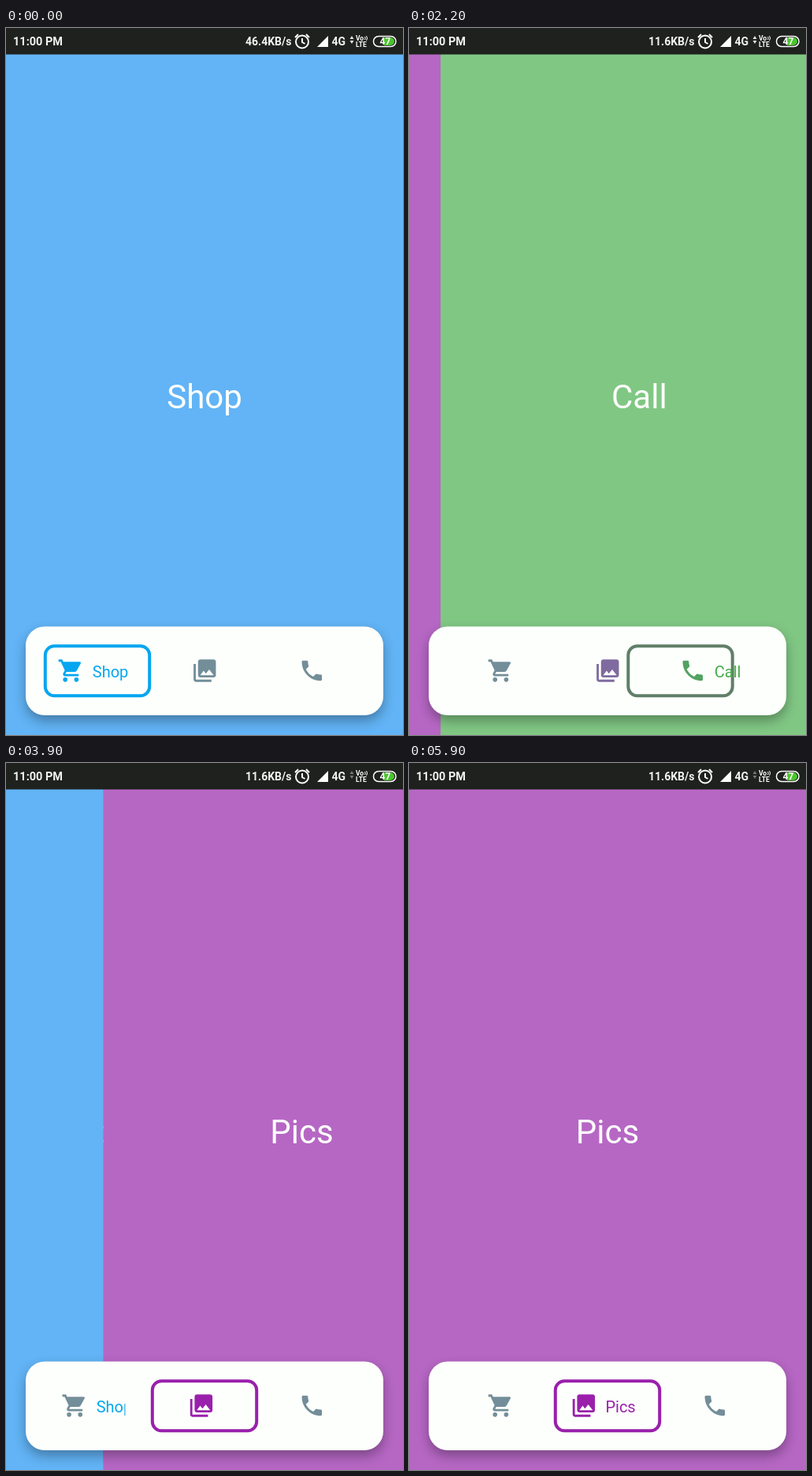
An HTML page with a canvas that plays this animation: 504 by 896 pixels, repeating every 6 s.

```html
<!DOCTYPE html>
<html lang="en">
<head>
<meta charset="utf-8">
<style>
  html, body { margin: 0; width: 100%; height: 100%; overflow: hidden; background: #1f211e; }
  canvas { display: block; }
</style>
</head>
<body>
<canvas id="stage" width="504" height="896"></canvas>
<script>
const ctx = document.getElementById('stage').getContext('2d');
const W = 504, H = 896, LOOP = 6000, STEP = 100;
const WHITE = '#fdfffc', GREY = [115, 142, 153];

const tabs = [
  { name: 'Shop', page: '#62b4f6', color: [5, 166, 240], icon:
    'M5 20a2 2 0 1 0 4 0a2 2 0 1 0-4 0zM15 20a2 2 0 1 0 4 0a2 2 0 1 0-4 0z' +
    'M1 2v2h2l3.6 7.59-1.35 2.45C4.5 15.4 5.5 17 7 17h12v-2H7.42c-.14 0-.25-.11-.25-.25l.03-.12.9-1.63h7.45' +
    'c.75 0 1.41-.41 1.75-1.03l3.58-6.49A1 1 0 0 0 20 4H5.21l-.94-2z' },
  { name: 'Pics', page: '#b667c4', color: [154, 32, 172], icon:
    'M22 16V4c0-1.1-.9-2-2-2H8c-1.1 0-2 .9-2 2v12c0 1.1.9 2 2 2h12c1.1 0 2-.9 2-2z' +
    'm-11-4l2.03 2.71L16 11l4 5H8l3-4zM2 6v14c0 1.1.9 2 2 2h14v-2H4V6z' },
  { name: 'Call', page: '#81c784', color: [68, 172, 72], icon:
    'M6.62 10.79c1.44 2.83 3.76 5.14 6.59 6.59l2.2-2.2c.27-.27.67-.36 1.02-.24 1.12.37 2.33.57 3.57.57' +
    '.55 0 1 .45 1 1V20c0 .55-.45 1-1 1-9.39 0-17-7.61-17-17 0-.55.45-1 1-1h3.5c.55 0 1 .45 1 1' +
    ' 0 1.25.2 2.45.57 3.57.11.35.03.74-.25 1.02z' }
];
for (const tab of tabs) tab.shape = new Path2D(tab.icon);

// [time of tap, tab index]
const taps = [[-2000, 0], [643, 1], [1297, 2], [2120, 1], [2880, 0], [3640, 1], [4175, 2], [5128, 1]];

const clamp = v => Math.min(1, Math.max(0, v));
const ease = u => u < .5 ? 2 * u * u : 1 - 2 * (1 - u) ** 2;
const mix = (a, b, k) => a + (b - a) * k;
const blend = (a, b, k) => `rgb(${a.map((v, i) => Math.round(mix(v, b[i], k)))})`;

function text(str, x, y, font, color, align = 'left') {
  ctx.font = font + ' Roboto, sans-serif';
  ctx.fillStyle = color;
  ctx.textAlign = align;
  ctx.fillText(str, x, y);
}

function roundRect(x, y, w, h, r) {
  ctx.beginPath();
  ctx.roundRect(x, y, w, h, r);
}

function fillShape(d, color) {
  ctx.fillStyle = color;
  ctx.fill(new Path2D(d));
}

function strokeShape(d, color, width) {
  ctx.strokeStyle = color;
  ctx.lineWidth = width;
  ctx.stroke(new Path2D(d));
}

function drawPages(position) {
  tabs.forEach((tab, i) => {
    const x = (i - position) * W;
    ctx.fillStyle = tab.page;
    ctx.fillRect(x, 33, W, H - 33);
    text(tab.name, x + 252, 482, '42px', WHITE, 'center');
  });
}

function drawStatus(t) {
  ctx.fillStyle = '#1f211e';
  ctx.fillRect(0, 0, W, 33.5);
  text('11:00 PM', 9, 22, 'bold 14.5px', '#f2f3f1');
  text((t < 1900 ? '46.4' : '11.6') + 'KB/s', 304, 22, 'bold 14px', '#f2f3f1');
  strokeShape('M384 17.5a8 8 0 1 0-16 0a8 8 0 1 0 16 0M376 13v5l3.5 2M367 12l4-4M385 12l-4-4', WHITE, 2);
  fillShape('M395 24h14V10z', WHITE);
  text('4G', 413.5, 22, 'bold 14px', '#f2f3f1');

  const busy = t < 100 || (t >= 1200 && t < 2900);
  fillShape('M436.500 14h5l-2.500-4zM436.500 16h5l-2.500 4z', busy ? '#e4e5e3' : '#777976');
  text('Vo', 444, 16, 'bold 8.500px', WHITE);
  strokeShape('M455.500 11q1.500 2 0 4M457.500 10q2.200 3 0 6', WHITE, 1);
  text('LTE', 444, 24, 'bold 8.500px', WHITE);

  ctx.fillStyle = '#4bc52e';
  roundRect(480, 12, 13, 10, [0, 5, 5, 0]);
  ctx.fill();
  ctx.strokeStyle = WHITE;
  ctx.lineWidth = 1.5;
  roundRect(466.5, 10.5, 28.5, 13, 6.5);
  ctx.stroke();
  text('47', 481.5, 21.2, 'bold 12px', WHITE, 'center');
}

function drawTab(tab, i, open, active) {
  ctx.font = '20px Roboto, sans-serif';
  const extra = open * (ctx.measureText(tab.name).width + 22.5);
  const x = 116.3 + i * 136 - extra / 2;

  ctx.save();
  ctx.translate(x - 17, 797.5);
  ctx.scale(34 / 24, 34 / 24);
  ctx.fillStyle = blend(GREY, tab.color, active);
  ctx.fill(tab.shape);
  ctx.restore();

  if (extra > 22) {
    ctx.save();
    ctx.beginPath();
    ctx.rect(x + 27, 795, extra - 21, 40);
    ctx.clip();
    text(tab.name, x + 27.5, 822.5, '20px', blend(tab.color, tab.color, 0));
    ctx.restore();
  }
}

function drawBar(from, to, elapsed) {
  ctx.save();
  ctx.shadowColor = 'rgba(0,0,0,.32)';
  ctx.shadowBlur = 15;
  ctx.shadowOffsetY = 7;
  ctx.fillStyle = WHITE;
  roundRect(25, 758.5, 454, 112.5, 24);
  ctx.fill();
  ctx.restore();

  const slide = ease(clamp(elapsed / 200));
  const label = clamp((elapsed - 217) / 300);
  const weight = (i, k) => i === to ? (from === to ? 1 : k) : i === from ? 1 - k : 0;

  ctx.strokeStyle = blend(tabs[from].color, tabs[to].color, slide);
  ctx.lineWidth = 4;
  roundRect(49.8 + mix(from, to, slide) * 136, 783.2, 132.4, 63, 11.5);
  ctx.stroke();
  tabs.forEach((tab, i) => drawTab(tab, i, weight(i, label), weight(i, slide)));
}

function draw(t) {
  const last = taps.findLastIndex(tap => tap[0] <= t);
  const [start, to] = taps[last];
  const from = taps[Math.max(0, last - 1)][1];
  const elapsed = t - start;
  drawPages(mix(from, to, ease(clamp(elapsed / 400))));
  drawStatus(t);
  drawBar(from, to, elapsed);
}

function tick() {
  draw(Math.floor(performance.now() % LOOP / STEP) * STEP);
  requestAnimationFrame(tick);
}
tick();
</script>
</body>
</html>
```
